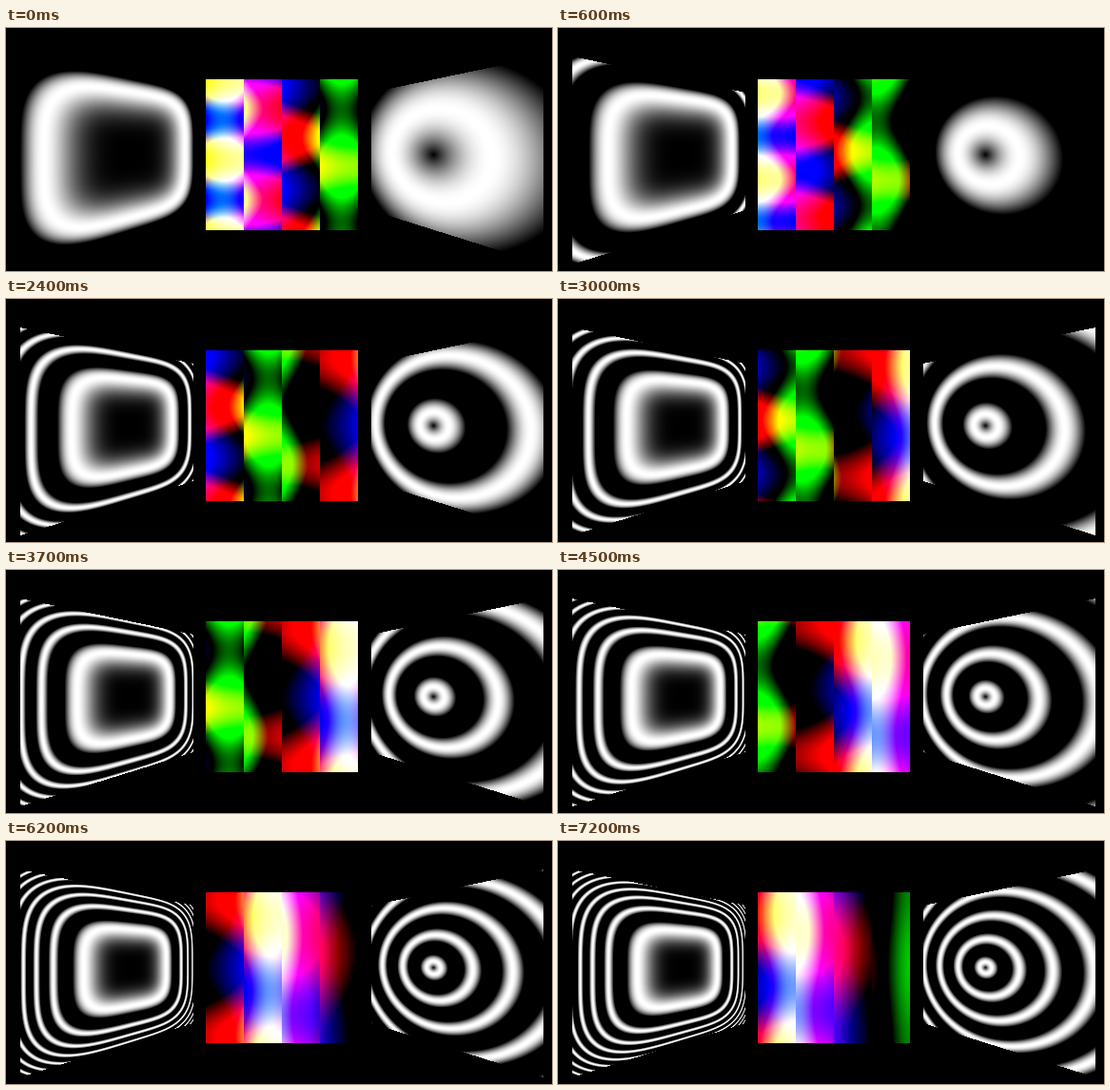
An HTML page with a canvas that plays this animation: 574x256 px, repeating every 7300 ms.

```html
<!DOCTYPE html>
<html lang="en">
<head>
<meta charset="utf-8">
<title>Three wave panels</title>
<style>
  html, body { margin: 0; width: 100%; height: 100%; overflow: hidden; background: #000; }
  canvas { display: block; }
</style>
</head>
<body>
<canvas id="stage" width="574" height="256"></canvas>
<script>
const W = 574, H = 256, STEP = 100, STEPS = 73;
const ctx = document.getElementById('stage').getContext('2d');
const picture = ctx.createImageData(W, H);
const pixels = picture.data;
for (let i = 3; i < pixels.length; i += 4) pixels[i] = 255;

// Side walls in perspective: tall at the outer edge, short at the inner edge.
const NEAR = { top: 30, height: 219 }, FAR = { top: 68, height: 124 };

function buildWall(outerX, innerX, shape) {
  const points = [];
  for (let x = Math.min(outerX, innerX); x < Math.max(outerX, innerX); x++) {
    const s = (x + 0.5 - outerX) / (innerX - outerX);
    const top = NEAR.top + (FAR.top - NEAR.top) * s;
    const height = NEAR.height + (FAR.height - NEAR.height) * s;
    const u = 2 * s * FAR.height / height - 1;
    for (let y = Math.ceil(top - 0.5); y + 0.5 < top + height; y++) {
      const v = 2 * (y + 0.5 - top) / height - 1;
      points.push({ at: 4 * (y * W + x), d: shape(u, v) });
    }
  }
  return points;
}

const softQuartic = a => a ** 4 * (1 - 0.08 * a * a);
const leftWall = buildWall(15, 197, (u, v) => softQuartic(u) + softQuartic(v));
const rightWall = buildWall(565, 384, Math.hypot);

function drawWall(wall, k) {
  for (const { at, d } of wall) {
    const c = 255 * Math.max(0, Math.sin(k * d));
    pixels[at] = pixels[at + 1] = pixels[at + 2] = c;
  }
}

const BACK = { x: 210, y: 54, w: 160, h: 159, column: 40 };

// Colours drift across the panel; each column has its own vertical wave.
function drawBack(n) {
  for (let px = 0; px < BACK.w; px++) {
    const phase = n / 12.5 + Math.floor(px / BACK.column);
    const s = phase + (px % BACK.column + 0.5) / BACK.column;
    const late = Math.max(0, s - 6);
    const fade = Math.min(1, Math.max(0.2, 1 - 0.15 * (s - 4)));
    const red = Math.cos(1.047 * (s - 1)) + 0.4 - 0.1 * late;
    const green = Math.cos(2.01 * (s - 0.45)) - 0.07 - 0.1 * late;
    const blue = Math.cos(1.05 * (s - 1)) + 0.1;
    for (let py = 0; py < BACK.h; py++) {
      const wave = fade * Math.cos(Math.PI * (py - 30.5 * phase) / (42 + 6 * phase));
      const at = 4 * ((BACK.y + py) * W + BACK.x + px);
      pixels[at] = 215 * (red + 1.3 * wave);
      pixels[at + 1] = 305 * (green + 0.6 * wave);
      pixels[at + 2] = 250 * (blue - 0.5 * wave);
    }
  }
}

let shown = -1;
function render(now) {
  const n = Math.floor(now / STEP) % STEPS;
  if (n !== shown) {
    drawWall(leftWall, (n + 10.2) / 3);
    drawWall(rightWall, (n + 10.3) / 4);
    drawBack(n);
    ctx.putImageData(picture, 0, 0);
    shown = n;
  }
}

const start = performance.now();
function tick() {
  render(performance.now() - start);
  requestAnimationFrame(tick);
}
tick();
</script>
</body>
</html>
```
